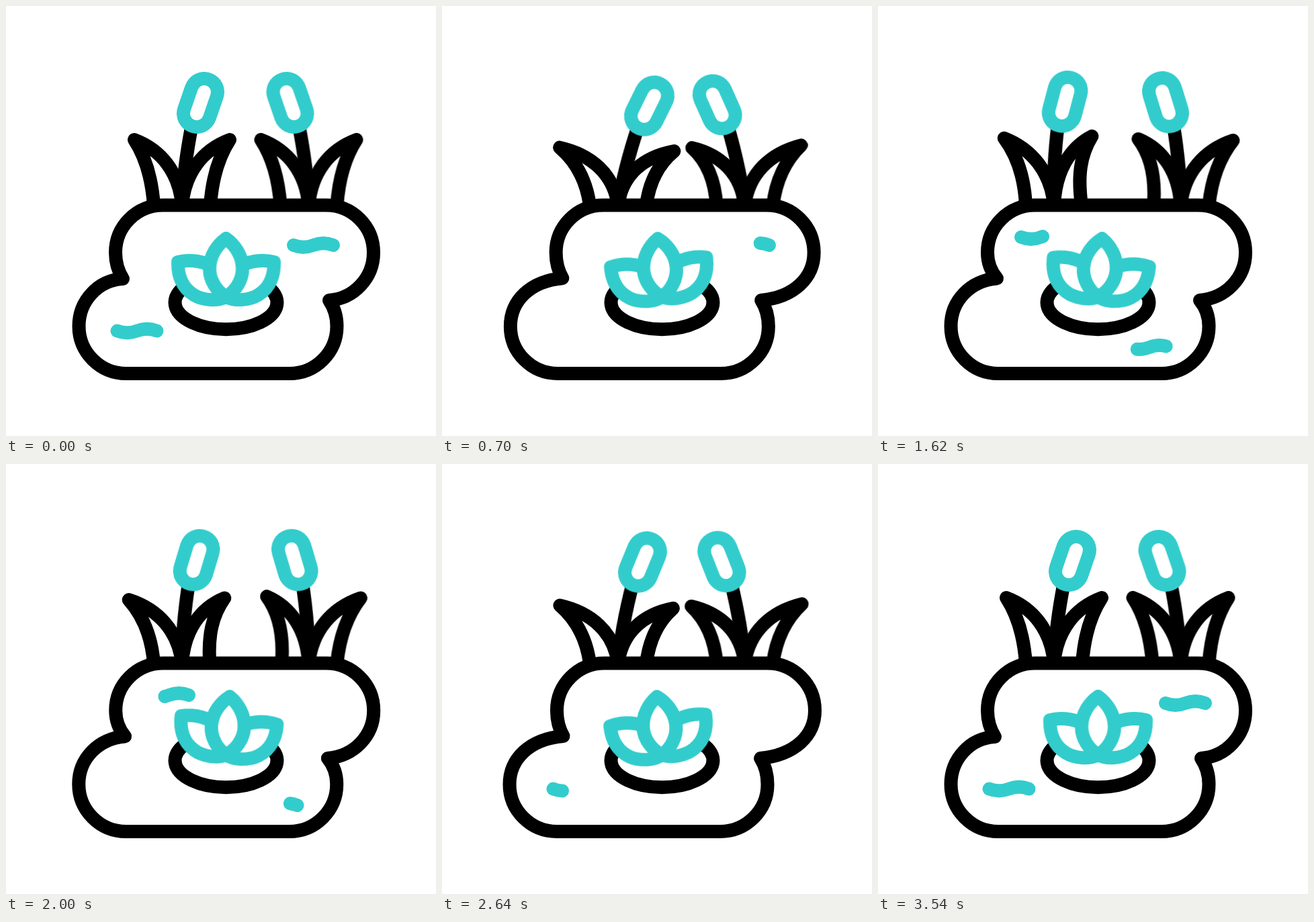
Recreate the animation shown at these times as an HTML page without scripts. Size 640x640 px, loop 3600 ms.

```html
<!DOCTYPE html>
<html lang="en">
<head>
<meta charset="utf-8">
<title>Pond</title>
<style>
@property --s { syntax: "<number>"; inherits: true; initial-value: 0 }
@property --e { syntax: "<number>"; inherits: true; initial-value: 1.03 }

html, body { margin: 0; width: 100%; height: 100%; overflow: hidden; background: #fff }
svg { display: block; width: 100%; height: 100% }
svg * {
  animation-duration: 3.6s;
  animation-iteration-count: infinite;
  animation-timing-function: cubic-bezier(.333, 0, .667, 1);
}
.line { fill: none; stroke: #000; stroke-width: 20; stroke-linecap: round; stroke-linejoin: round }
.teal { stroke: #33cccc }
.plant { stroke-linecap: butt }
.head { stroke: #33cccc; stroke-width: 60; stroke-linecap: round }
.hole { stroke: #fff; stroke-linecap: round }

/* Pond outline: upper and lower halves slide apart */
.pond { animation-name: pond }
@keyframes pond {
  0%, 1.67%, 98.33%, 100% { d: path("M174 406C167 395 163 381.5 163 367C163 328 194.5 296.5 233.5 296.5L476.5 296.5C515.5 296.5 547 328 547 367C547 404.5 518 435.5 481 438C488.5 449 492.5 462 492.5 476.5C492.5 515.5 461 547 422 547L179 547C140 547 108.5 515.5 108.5 476.5C108.5 439 137 408 174 406Z") }
  25.83%, 74.17% { d: path("M180.5 405C174.5 394.5 171 381.5 171 367C171 328 202.5 296.5 241.5 296.5L484.5 296.5C523.5 296.5 555 328 555 367C555 404.5 525 433 474 438C481 449 484.5 462 484.5 477C484.5 515.5 453 547 414 547L171 547C132 547 100.5 515.5 100.5 477C100.5 439 130 409.5 180.5 405Z") }
  50% { d: path("M176.5 405.5C167 394.5 162 381.5 162 367C162 328 193.5 296.5 232.5 296.5L475.5 296.5C514.5 296.5 546 328 546 367C546 404.5 517 435 479.6 438C489 449 493.5 462 493.5 476.5C493.5 515.5 462 547 423 547L180 547C141 547 109.5 515.5 109.5 476.5C109.5 439 138 408.5 176.5 405.5Z") }
}

/* Lotus petals */
.petals { fill: #fff; animation-name: sway }
.outer { --tilt: 7deg }
.inner { --tilt: 5deg }
@keyframes sway {
  0%, 1.67%, 98.33%, 100% { transform: rotate(0deg) }
  25.83%, 74.17% { transform: rotate(calc(-1 * var(--tilt))) }
  50% { transform: rotate(var(--tilt)) }
}

/* Cattails */
.reed-a { animation-name: reed-a }
.reed-b { animation-name: reed-b }
@keyframes reed-a {
  0%, 1.67%, 98.33%, 100% { transform: rotate(0deg) }
  22.2% { transform: rotate(7.6deg) }
  46.7% { transform: rotate(-4.4deg) }
  72.2% { transform: rotate(3.4deg) }
}
@keyframes reed-b {
  0%, 1.67%, 98.33%, 100% { transform: rotate(0deg) }
  27.8% { transform: rotate(6.6deg) }
  50% { transform: rotate(-3.1deg) }
  80.6% { transform: rotate(3.4deg) }
}

/* Leaves */
.leaf-a1 { animation-name: leaf-a1 }
.leaf-a2 { animation-name: leaf-a2 }
.leaf-b1 { animation-name: leaf-b1 }
.leaf-b2 { animation-name: leaf-b2 }
@keyframes leaf-a1 {
  0%, 1.67%, 98.33%, 100% { d: path("M-42 0C-45-42-56-75-71-98C-31-83-4-49 0 0") }
  22.8%, 68% { d: path("M-42 0C-47.5-40-66-67.5-88-85.5C-41-75.5-6.5-47 0 0") }
  46.7% { d: path("M-42 0C-44-42.5-56-76.5-74-100.5C-33-84.5-4.5-49.5 0 0") }
}
@keyframes leaf-a2 {
  0%, 1.67%, 98.33%, 100% { d: path("M42 0C45-42 56-75 71-98C31-83 4-49 0 0") }
  22.2% { d: path("M42 0C47-39.5 64-64 84-80C39-72 6-46.5 0 0") }
  46.7% { d: path("M41 0C35-43 38-74 56-103.5C22.5-86 2-50 0 0") }
  72.2% { d: path("M42 0C47-39.5 63-65.5 82-82C38-73.5 6-46.5 0 0") }
}
@keyframes leaf-b1 {
  0%, 1.67%, 98.33%, 100% { d: path("M-42 0C-45-42-56-75-71-98C-31-83-4-49 0 0") }
  27.8% { d: path("M-42 0C-44-39.5-59-65.5-80.5-82C-37-73.5-5.5-46.5 0 0") }
  50% { d: path("M-40 0C-36-43-43-77-60.5-101.5C-24.5-85-2.5-49.5 0 0") }
  80.6% { d: path("M-42 0C-46.5-39.5-63-65.5-82.5-82.5C-38-73.5-5.5-46.5 0 0") }
}
@keyframes leaf-b2 {
  0%, 1.67%, 98.33%, 100% { d: path("M42 0C45-42 56-75 71-98C31-83 4-49 0 0") }
  27.8% { d: path("M42 0C47.5-40.5 66-68.5 88-87C41-76.5 6.5-47.5 0 0") }
  50% { d: path("M42 0C46-42 59-75 76.5-98.5C34-83.5 5-49 0 0") }
  80.6% { d: path("M42 0C47.5-40.5 65.5-68.5 86.5-87C40.5-76.5 6.5-47.5 0 0") }
}

/* Ripples: visible from --s to --e along the path */
.ripple {
  stroke-dasharray: calc(var(--e) - var(--s)) 3;
  stroke-dashoffset: calc(-1 * var(--s));
}
.right { animation-name: right-s, right-e }
.left { animation-name: left-s, left-e }
.low { animation-name: low-s, low-e }
.high { animation-name: high-s, high-e }
@keyframes right-s { 0%, 3.06% { --s: 0 } 27.2%, 74.16% { --s: 1.02 } 74.17%, 100% { --s: 0 } }
@keyframes right-e { 0%, 74.16% { --e: 1.03 } 74.17% { --e: 0 } 98.33%, 100% { --e: 1.03 } }
@keyframes left-s { 0%, 1.67% { --s: 0 } 18.33%, 65.96% { --s: 1.02 } 65.97%, 100% { --s: 0 } }
@keyframes left-e { 0%, 65.96% { --e: 1.03 } 65.97% { --e: 0 } 90.14%, 100% { --e: 1.03 } }
@keyframes low-s { 0%, 25.82% { --s: 1.02 } 25.83%, 38.33% { --s: 0 } 62.5%, 100% { --s: 1.02 } }
@keyframes low-e { 0%, 25.82% { --e: 1.03 } 25.83% { --e: 0 } 50%, 100% { --e: 1.03 } }
@keyframes high-s { 0%, 32.49% { --s: 1.02 } 32.5%, 45.36% { --s: 0 } 69.5%, 100% { --s: 1.02 } }
@keyframes high-e { 0%, 32.49% { --e: 1.03 } 32.5% { --e: 0 } 56.67%, 100% { --e: 1.03 } }
</style>
</head>
<body>
<svg viewBox="0 0 640 640">
  <defs>
    <g id="cattail">
      <path d="M0 0Q2-55 15-121"/>
      <path class="head" d="M33-169L22-137"/>
      <path class="hole" d="M33-169L22-137"/>
    </g>
    <path id="petal" d="M-26-48C-38-54-58-56-71.5-52C-72-33-66-14-48-3C-35 5-14 7 0 0"/>
  </defs>

  <g class="line plant" transform="translate(262 297)">
    <path class="leaf-a1"/>
    <path class="leaf-a2"/>
    <g class="reed-a"><use href="#cattail"/></g>
  </g>
  <g class="line plant" transform="translate(450.5 297)">
    <path class="leaf-b1"/>
    <path class="leaf-b2"/>
    <g transform="scale(-1 1)"><g class="reed-b"><use href="#cattail"/></g></g>
  </g>

  <path class="line pond"/>

  <g class="line teal">
    <path class="ripple right" pathLength="1" d="M428 356c10 4 19 4 29.5 0s19.5-4 29.5 0"/>
    <path class="ripple left" pathLength="1" d="M165.5 483.5c10 4 19 4 29.5 0s19.5-4 29.5 0"/>
    <path class="ripple low" pathLength="1" d="M374.5 508c10 4 19 4 29.5 0s19.5-4 29.5 0"/>
    <path class="ripple high" pathLength="1" d="M213 344c10 4 19 4 29.5 0s19.5-4 29.5 0"/>
  </g>

  <path class="line" d="M267 417A76 40 0 1 0 388 417"/>
  <g class="line teal" transform="translate(327.5 433)">
    <g class="petals outer">
      <use href="#petal"/>
      <use href="#petal" transform="scale(-1 1)"/>
    </g>
    <g class="petals inner">
      <path d="M0-87C-12.5-78-24.5-62-24.5-42C-24.5-25-14.5-9 0 0C14.5-9 24.5-25 24.5-42C24.5-62 12.5-78 0-87Z"/>
    </g>
  </g>
</svg>
</body>
</html>
```
